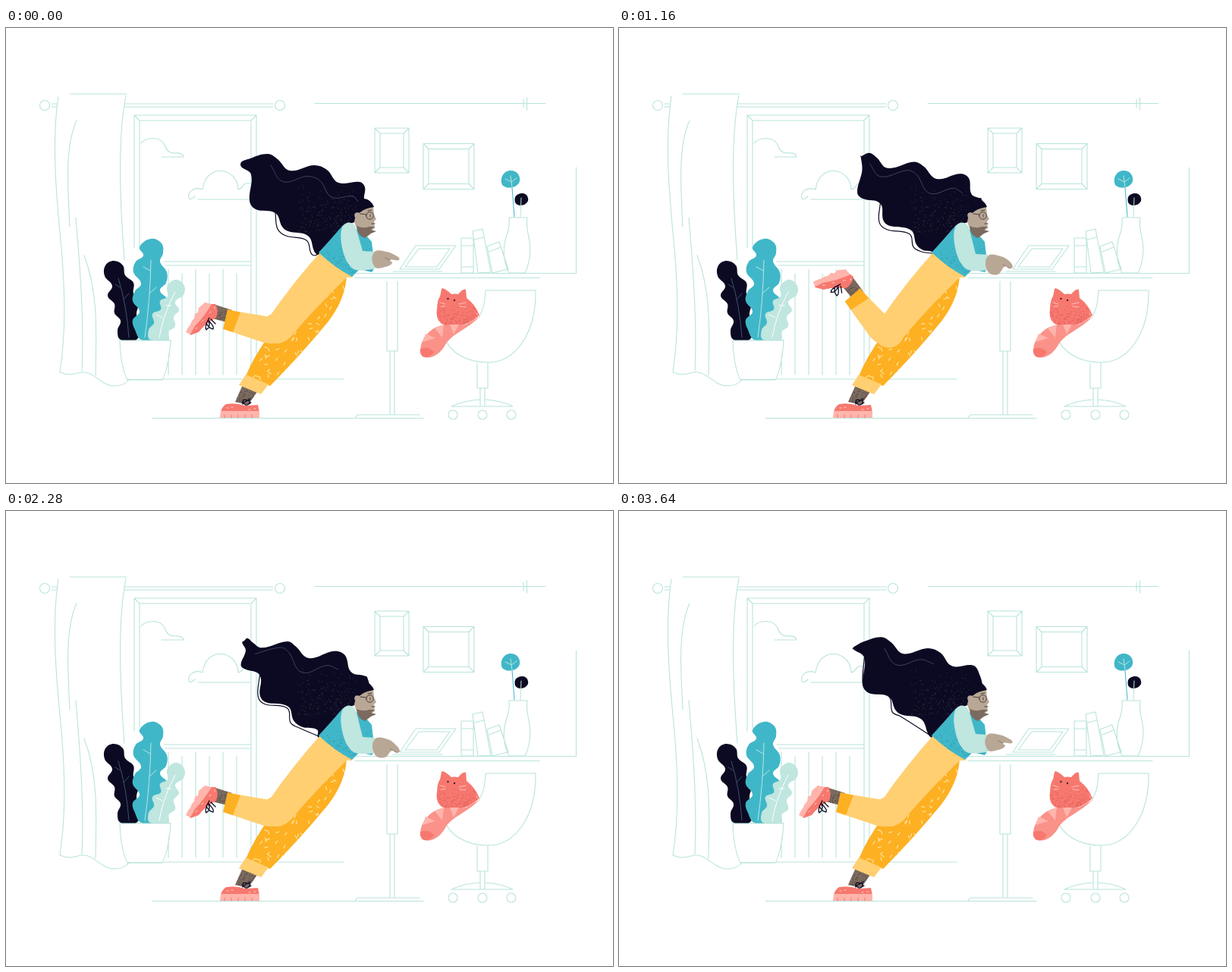
Write an HTML page with a canvas that moves like this. It is 800 by 600 pixels and loops after 3680 ms.

```html
<!DOCTYPE html>
<html lang="en">
<head>
<meta charset="utf-8">
<title>Desk scene</title>
<style>
html, body { margin: 0; width: 100%; height: 100%; overflow: hidden; background: #fff; }
canvas { display: block; }
</style>
</head>
<body>
<canvas id="stage" width="800" height="600"></canvas>
<script>
const g = document.getElementById('stage').getContext('2d');
const LOOP = 3680;
const MINT = '#b9e4dc', PALE = '#bfe6df', TEAL = '#40b7c8', NAVY = '#0b0a22', CORAL = '#f7786f',
  ROSE = '#ffb4ac', YELLOW = '#ffcf72', AMBER = '#fdb022', BROWN = '#7b6a5f', TAN = '#b9a796';

const clamp = v => Math.max(0, Math.min(1, v));
const ramp = (v, a, b) => { const u = clamp((v - a) / (b - a)); return u * u * (3 - 2 * u); };
const mix = (a, b, u) => [a[0] + (b[0] - a[0]) * u, a[1] + (b[1] - a[1]) * u];
const pts = s => s.split(' ').map(p => p.split(',').map(Number));
const asPath = d => d instanceof Path2D ? d : new Path2D(d);

function fill(color, d) {
  g.fillStyle = color;
  g.fill(asPath(d));
}
function line(color, width, d) {
  g.strokeStyle = color;
  g.lineWidth = width;
  g.lineCap = g.lineJoin = 'round';
  g.stroke(asPath(d));
}

// Smooth curve through points; handles scale with each segment so it stays calm.
function spline(p, closed) {
  const n = p.length, path = new Path2D();
  const at = i => closed ? p[(i + n) % n] : p[Math.max(0, Math.min(n - 1, i))];
  const dir = i => {
    const a = at(i - 1), b = at(i + 1), l = Math.hypot(b[0] - a[0], b[1] - a[1]) || 1;
    return [(b[0] - a[0]) / l, (b[1] - a[1]) / l];
  };
  path.moveTo(...p[0]);
  for (let i = 0; i < (closed ? n : n - 1); i++) {
    const a = at(i), b = at(i + 1), u = dir(i), v = dir(i + 1);
    const h = Math.hypot(b[0] - a[0], b[1] - a[1]) * .36;
    path.bezierCurveTo(a[0] + u[0] * h, a[1] + u[1] * h, b[0] - v[0] * h, b[1] - v[1] * h, b[0], b[1]);
  }
  if (closed) path.closePath();
  return path;
}

// Seeded grain inside a shape, denser towards the bottom.
function grain(shape, color, count, x, y, w, h, dash = 0) {
  let seed = 7;
  const rnd = () => (seed = seed * 16807 % 2147483647) / 2147483647;
  g.save();
  g.clip(asPath(shape));
  g.fillStyle = g.strokeStyle = color;
  g.lineWidth = 1.3;
  for (let i = 0; i < count; i++) {
    const px = x + w * rnd(), py = y + h * (dash ? rnd() : Math.sqrt(rnd()));
    if (dash) {
      const a = rnd() * 3;
      g.beginPath();
      g.moveTo(px, py);
      g.lineTo(px + dash * Math.cos(a), py + dash * Math.sin(a));
      g.stroke();
    } else g.fillRect(px, py, 1, 1);
  }
  g.restore();
}

// Position along a list of points, one every `step` of phase.
function track(text, start, step = .5) {
  const p = pts(text);
  return phase => {
    const u = Math.max(0, Math.min(p.length - 1.001, (phase - start) / step)), i = Math.floor(u);
    return mix(p[i], p[i + 1], u - i);
  };
}

// Waves in the hair travel from head to tip, one wavelength per loop.
const corner = track('478,228 477,222 473,210 454,191 423,187 389,180 358,173 329,170 308,180', -1);
const crest = track('475,228 475,222 466,203 440,186 406,181 379,174 345,166 321,164 309,180', -1);
const hollow = track('472,225 460,215 438,204 407,196 374,188 342,183 322,172 316,168 308,181', -1);
const lobe = track('406,294 384,281 364,262 339,248 321,228 310,210 308,181', 0);
const belly = track('409,298 396,290 372,268 346,256 329,239 317,217 309,182', 0);
const notch = track('411,299 414,293 398,274 377,262 355,244 338,224 323,193 319,184 306,183', 0);
const tip = track('309,180 319,167 316,169 306,178 309,180', 0, .25);

function hair(t) {
  const p = [];
  for (let k = -1; k < 3; k++) p.push(corner(t + k), crest(t + k), hollow(t + k));
  p.push(tip(t), notch(t + 3));
  for (let k = 2; k >= 0; k--) p.push(lobe(t + k), belly(t + k), notch(t + k));
  p.push(...pts('412,299 440,300 452,264 462,245 478,236'));
  const shape = spline(p, true);
  fill(NAVY, shape);
  grain(shape, '#39364a', 200, 385, 205, 75, 65);

  // loose strand below
  const hang = (f, q, dx, dy) => {
    const w = clamp((1.9 - q) * 1.5), a = f(q);
    return [a[0] + dx * w, a[1] + dy * w];
  };
  line(NAVY, 1.2, spline([notch(t + 2), hang(lobe, t + 1, -6, 3), hang(belly, t + 1, -3, 6),
    hang(notch, t + 1, -2, 6), hang(lobe, t, -4, 3), hang(belly, t, -2, 2), [412, 297]]));

  // light line inside
  const inset = (f, q) => {
    const a = f(q);
    return [a[0] - 9, a[1] + 19 - 11 * clamp(q - .6)];
  };
  const end = inset(corner, t + 1), late = ramp(t, .65, .9), bend = inset(hollow, t + 1);
  const inner = [mix(mix(inset(corner, t + 2), bend, ramp(t, .45, .62)), end, late), mix(bend, end, late),
    mix(inset(crest, t + 1), end, late), end, inset(hollow, t), inset(crest, t), inset(corner, t)];
  g.save();
  g.clip(shape);
  line('#3b4260', 1, spline(inner));
  g.restore();
}

const LEAVES = [
  ['142,307 154,313 157,326 168,336 168,350 175,361 172,378 177,392 172,411 151,411 147,399 151,386 143,376 143,364 134,353 140,340 130,327 131,313', NAVY],
  ['191,278 205,284 207,297 203,308 212,322 211,336 203,346 212,357 213,371 203,381 200,395 196,411 178,411 170,398 167,385 176,374 167,360 170,347 178,337 168,322 171,308 181,300 176,289', TEAL],
  ['226,332 235,340 234,352 223,361 228,372 221,381 223,393 214,401 214,411 190,411 188,398 195,389 193,377 204,371 203,360 213,354 212,342 218,334', PALE]
].map(([s, c]) => [spline(pts(s), true), c]);

const circle = (x, y, r) => `M${x - r},${y}a${r},${r} 0 1 0 ${2 * r},0a${r},${r} 0 1 0 ${-2 * r},0`;
const frame = (x, y, w, h, d) => `M${x},${y}h${w}v${h}h${-w}zM${x + d},${y + d}h${w - 2 * d}v${h - 2 * d}h${2 * d - w}z` +
  `M${x},${y}l${d},${d}M${x + w},${y}l${-d},${d}M${x},${y + h}l${d},${-d}M${x + w},${y + h}l${-d},${-d}`;

const ROOM = new Path2D([
  // curtain and rod
  'M84,87H159M69,90C60,150 66,220 73,290C78,350 79,400 71,454C88,461 96,452 104,454C118,455 126,473 145,472Q156,471 162,464',
  'M158,89C146,150 151,240 156,306M93,122C78,155 81,205 84,262M92,250C98,320 103,390 100,452M103,300C122,350 119,400 118,458',
  'M60,100H67M60,104H67M157,100H352M156,104H352', circle(51, 102, 6.5), circle(361, 102, 6.5),
  // window
  'M169,290V115H330V460M176,290V122H323V460M169,115L176,122M330,115L323,122M208,308H323M210,313H323',
  'M178,152C184,144 203,142 209,154Q212,165 222,165Q233,164 234,170H205M322,205C310,203 314,212 306,213C305,191 284,184 272,191Q261,197 259,213C246,208 239,218 241,224Q243,228 249,222M253,226H322',
  ...[214, 232, 250, 268, 286, 304].map(x => `M${x},${x % 4 ? 318 : 324}V457`),
  'M160,463H445M193,514.5H550',
  // shelf and pictures
  'M407,99.5H711M682,94V105M686.500,92V108', frame(486, 132, 45, 59, 7), frame(550, 152.500, 67, 60, 7),
  // desk and tablet
  'M458,323.500H751.500V184M460,329.500H703M502,334V426H516V334M506,426V510M512,426V510M460,514L463,510H545',
  'M519,318L540,287H593L571,318ZM526,315L544,291H585L568,315ZM510,321H575',
  // books and vase
  'M600,277H616V323H600ZM600,287H616M600,315H616M615,268L628,265L639,322L622,323ZM617,279L630,276M634,288L650,282L662,318L641,323ZM637,295L652,289',
  'M663,250H687C684,265 691,275 691,294Q690,311 684,323H663C654,305 655,286 661,270Q664,260 663,250',
  // chair
  'M632,346H698C699,400 673,441 635,441C606,441 585,427 578,409M632,346C631,364 629,371 624,380',
  'M621,442V475H635V442M625,475V499M631,475V499M587,499Q604,491 625,490M631,490Q652,491 668,499M587,499H668',
  circle(589, 510, 6), circle(628, 510, 6), circle(666, 510, 6),
  // pot
  'M150,412H217Q215,445 206,464H160Q151,445 150,412Z'
].join(''));

function room() {
  line(MINT, 1.1, ROOM);
  for (const [shape, color] of LEAVES) fill(color, shape);
  line('#40506c', 1, 'M148,330Q159,365 162,408M150,342L144,338M155,358L162,350');
  line('#b5e7e8', 1, 'M191,306Q190,360 183,408M181,315L190,320M189,350L198,342');
  line('#fff', 1, 'M223,348Q207,378 202,408M211,366L218,366M206,382L198,378');
  fill('#fff', 'M151,412H216Q214,445 206,463H160Q152,445 151,412Z');
  line(MINT, 1.1, 'M150,412H217');

  fill(TEAL, 'M665,188C674,188 678,195 677,202C675,210 661,214 654,207C650,198 656,188 665,188Z');
  fill(NAVY, 'M679,218C686,217 689,223 688,228C685,235 674,236 671,230C669,222 673,219 679,218Z');
  line(TEAL, 1, 'M667,210L670,249');
  line(MINT, 1, 'M665,195L667,210M658,199L666,203L673,198M679,224L678,249');
}

function cat() {
  const body = 'M574,344Q576,341 587,351Q592,350 596,351Q603,343 606,345L607,356Q619,365 624,379Q606,395 584,393Q565,391 568,370Q569,357 572,354Z';
  const tail = 'M624,381C607,398 590,402 580,416C573,430 560,438 549,433C541,421 552,402 566,395C580,389 594,392 606,391Z';
  fill(CORAL, body);
  grain(body, '#d95b5a', 230, 568, 362, 54, 34);
  fill('#fa9289', tail);
  fill(ROSE, 'M549,414L566,409L553,403ZM565,396L575,408L577,391ZM585,391L590,404L597,391Z');
  fill(CORAL, 'M546,423Q556,419 564,427Q558,437 549,433Q545,429 546,423Z');
  line('#ffc2ba', 1, 'M572,362L579,364M573,367L579,367M597,364L606,362M598,367L606,368M620,376L624,382');
  fill('#3a2434', circle(582.5, 357, 1.2) + circle(591, 359, 1.2));
}

function frontLeg() {
  const leg = 'M449,325Q448,357 424,388Q386,434 348,472L316,459Q326,434 347,405Z';
  fill(BROWN, 'M314,466L333,477L319,497L302,493Z');
  grain('M314,466L333,477L319,497L302,493Z', '#54473f', 130, 300, 465, 34, 32);
  fill(AMBER, leg);
  grain(leg, '#ffdf94', 150, 315, 330, 130, 140, 4);
  fill(YELLOW, 'M316,457L346,470L336,483L307,471Z');
  fill(CORAL, 'M290,496Q304,494 315,498L332,497L334,507H283Q284,500 290,496Z');
  fill(ROSE, 'M283,505H334V514H282Z');
  line(CORAL, 1, 'M288,510V514M297,510V514M306,510V514M315,510V514M324,510V514');
  line('#ffd2c9', 1, 'M291,501H293M297,500H299M320,503H322M327,502H329');
  line(NAVY, 1.3, 'M312,496Q311,488 317,491Q324,490 320,496Q315,499 313,494L322,489M318,497L323,494');
}

function backLeg(kick) {
  g.save();
  g.translate(356, 394 + 6 * kick);
  g.rotate(kick * 40 * Math.PI / 180);
  g.translate(-356, -394);
  const ankle = 'M276,365L298,372L291,388L272,383Z';
  fill(BROWN, ankle);
  grain(ankle, '#54473f', 90, 272, 365, 26, 22);
  fill(CORAL, 'M262,364L276,364Q281,372 277,382Q262,390 254,401L243,405L239,398Z');
  fill(ROSE, 'M262,362L271,364Q261,381 249,393L243,404L237,401L240,395L243,391L245,386L248,383L249,377L253,375L254,369Z');
  line('#ffd2c9', 1, 'M275,368V370M270,374L268,376M260,385L258,387M252,395L250,397');
  line(NAVY, 1.3, 'M268,382Q261,394 264,398Q270,394 267,386Q275,394 273,397Q267,396 264,389M270,384L276,390');
  fill(YELLOW, 'M300,373L348,381L372,380L372,408Q358,419 340,415L292,399Z');
  fill(AMBER, 'M292,371L309,375L299,401L286,397Z');
  fill(YELLOW, circle(357, 396, 20));
  g.restore();
  fill(YELLOW, 'M414,296Q378,336 347,381L345,408L362,414Q372,413 380,402Q404,373 449,329L457,329L440,303Z');
}

function upperBody(press, bob) {
  const shirt = 'M444,260Q426,281 412,296Q432,315 456,328L466,318L482,322Q486,318 485,309L482,282L470,268Z';
  fill(TEAL, shirt);
  grain(shirt, '#2b94ab', 170, 412, 285, 70, 38);

  // head
  fill(TAN, 'M461,240L466,235L484,236L485,246L488,252L485,255L486,264L476,270L463,266L459,256Z');
  fill(BROWN, 'M462,261Q471,265 478,262L486,262L481,266L488,268L481,271L473,277Q463,274 462,261Z');
  fill(NAVY, 'M460,243Q461,227 472,225Q481,226 485,236Q472,238 467,243Q460,245 459,256L450,260Z');
  fill(TAN, circle(463, 247, 3.8));
  line('#4a3a3a', 1, circle(479.5, 247.5, 4.8) + 'M467,245L475,246M480,246V249M477,241L482,240M482,258H486');

  // near arm
  const d = 4 * press;
  fill(PALE, `M443,263C447,254 459,254 462,266L470,${294 + d}L486,${295 + d}L487,${317 + d / 2}Q466,322 458,318Q446,310 442,284Q440,271 443,263Z`);
  const up = pts('485,296 501,295 517,302 518,306 506,306 509,310 500,315 486,315');
  const down = pts('486,301 503,301 514,309 519,317 515,319 509,316 499,325 486,321');
  const hand = up.map((a, i) => {
    const p = mix(a, down[i], press);
    return i > 1 && i < 6 ? [p[0], p[1] - bob] : p;
  });
  fill(TAN, spline(hand, true));
  line('#7d6b60', .8, spline([hand[4], mix(hand[4], hand[0], .3)]));
}

function draw(now) {
  const ms = now % LOOP;
  g.fillStyle = '#fff';
  g.fillRect(0, 0, 800, 600);
  room();
  cat();
  hair(ms / LOOP);

  const swing = (1 - Math.cos((ms - 880) / (1400 / 3) * 2 * Math.PI)) / 2;
  const kick = ms > 880 && ms < 2746 ? swing : 0;
  const press = ramp(ms, 900, 1060) * (1 - ramp(ms, 2860, 3020));
  const bob = press * (1 - Math.cos(ms / 320 * 2 * Math.PI)) * 1.2;
  frontLeg();
  backLeg(kick);
  upperBody(press, bob);
}

const begin = performance.now();
function tick() {
  draw(performance.now() - begin);
  requestAnimationFrame(tick);
}
tick();
</script>
</body>
</html>
```
